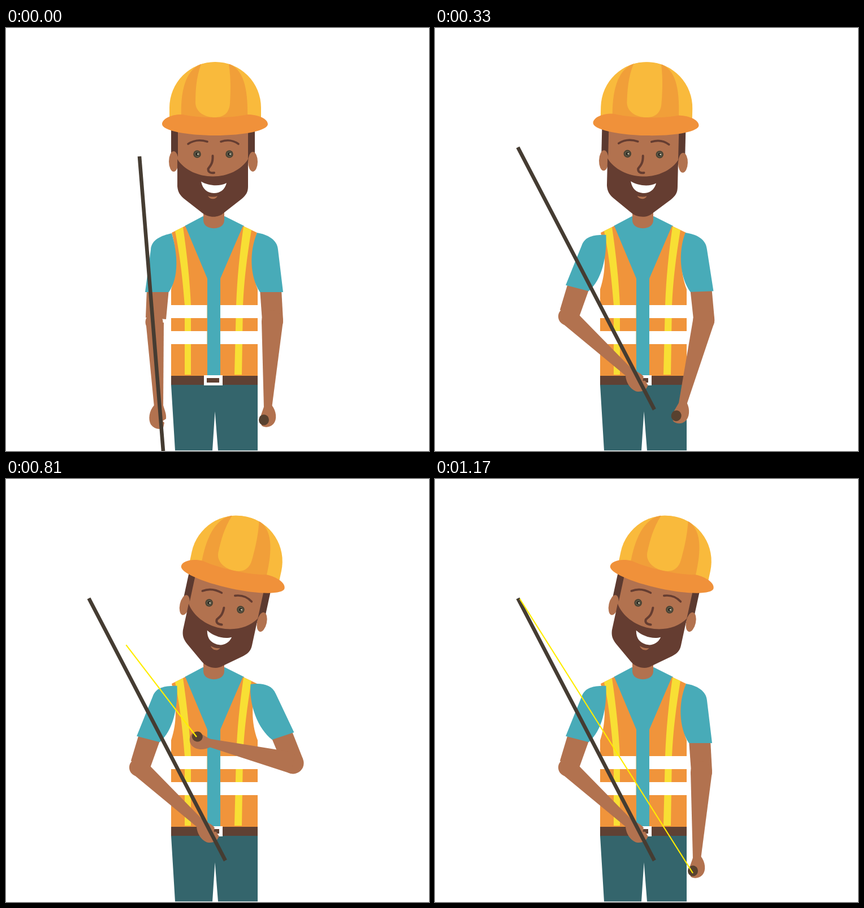
Recreate the animation shown at these times as an HTML page with a canvas. Size 748 px wide and 748 px high, loop 1.77 s.

```html
<!DOCTYPE html>
<html lang="en">
<head>
<meta charset="utf-8">
<title>Worker with rod</title>
<style>
  html, body { margin: 0; width: 100%; height: 100%; overflow: hidden; background: #fff; }
  canvas { display: block; width: 748px; height: 748px; }
</style>
</head>
<body>
<canvas id="stage" width="748" height="748"></canvas>
<script>
const ctx = document.getElementById('stage').getContext('2d');
const LOOP = 1770, STEP = 30, LAST_STEP = 38;

const SKIN = '#b2724f', HAIR = '#653d31', TEAL = '#48abb8', VEST = '#f0943b',
  YELLOW = '#f8df34', BELT = '#5f4133', PANTS = '#34656c', ROD = '#453c32',
  HELMET = '#f9ba3c', HELMET_DARK = '#f19f39', BRIM = '#f0913a', THREAD = '#ffed00';

const clamp = v => Math.min(1, Math.max(0, v));
const ramp = (n, from, to) => clamp((n - from) / (to - from));
const mix = (a, b, u) => a + (b - a) * u;

function fill(color, d) {
  ctx.fillStyle = color;
  ctx.fill(new Path2D(d));
}

function stroke(color, width, d, cap = 'round') {
  ctx.strokeStyle = color;
  ctx.lineWidth = width;
  ctx.lineCap = cap;
  ctx.stroke(new Path2D(d));
}

function oval(color, x, y, rx, ry = rx) {
  ctx.fillStyle = color;
  ctx.beginPath();
  ctx.ellipse(x, y, rx, ry, 0, 0, Math.PI * 2);
  ctx.fill();
}

function rotateAbout([x, y], degrees) {
  ctx.translate(x, y);
  ctx.rotate(degrees * Math.PI / 180);
  ctx.translate(-x, -y);
}

function turned(pivot, degrees, draw) {
  ctx.save();
  rotateAbout(pivot, degrees);
  draw();
  ctx.restore();
}

function drawBody() {
  fill(TEAL, 'M348 333L316 350L354 443V616H381V443L421 350L387 333Z');
  fill(SKIN, 'M349 315H386V340C386 359 349 359 349 340Z');

  fill(VEST, 'M293 362L317 350L356 443V615H292V462C303 430 302 395 293 362Z');
  fill(VEST, 'M444 362L419 350L379 443V615H445V462C433 430 434 395 444 362Z');
  fill(YELLOW, 'M299 359L313 352C320 400 325 445 327 490V613H316V490C312 440 308 405 299 359Z');
  fill(YELLOW, 'M420 351L434 357C426 405 421 445 419 490L417 613H404L407 490C409 440 413 400 420 351Z');
  ctx.fillStyle = '#fff';
  for (const y of [490, 536]) {
    ctx.fillRect(291, y, 64.5, 23);
    ctx.fillRect(379, y, 67, 23);
  }

  fill(PANTS, 'M292 631H445V747H375L369.5 678L365 747H299Z');
  fill(BELT, 'M292 615H445V631H292Z');
  fill('#fff', 'M350 614H383V632H350Z');
  fill(BELT, 'M355 619H377V627H355Z');
}

function drawHead() {
  fill('#5c3a30', 'M292 180H440V222L428 236H303L292 222Z');
  oval(SKIN, 296.5, 236, 8.5, 18);
  oval(SKIN, 436.5, 236.5, 8.5, 17.5);
  fill(SKIN, 'M304 178H428V240C420 275 312 275 304 240Z');
  fill(HAIR, 'M303 232C315 251 340 262.5 366 262.5S416 251 428 232V280C428 290 425 295 417 302'
    + 'L385 327C376 336 358 336 347 327L315 302C307 295 304 290 303 280Z');
  fill('#fff', 'M345 271.5C358 279 377 281 390 274C387 287 377 292.5 367 292C356 291 348 286 345 271.5Z');
  fill(SKIN, 'M357 297C363 299 369 299 374 297C371 304 361 304 357 297Z');
  stroke(HAIR, 4, 'M365.5 226C366 239 362 243 357.5 249C357 255 362 257 368 256');
  stroke(HAIR, 3.6, 'M322 205Q337 195 356 201M380 201Q397 195 411 205');
  for (const x of [338, 395]) {
    oval('#4b4435', x, 223, 6.8);
    oval('#77715c', x, 223, 4.2);
    oval('#2f2c25', x, 223, 3.2);
    oval('#d5d0b4', x + 1.5, 223, 1.4);
  }

  fill(HELMET, 'M289 160V141A81 81 0 0 1 451 141V160Z');
  fill(HELMET_DARK, 'M344 64C316 76 308 115 310 160H427C428 115 423 76 396 64Z');
  fill(HELMET, 'M345 64Q369 57 394 64C398 90 397 115 396 133C395 150 385 158 369 158'
    + 'S336 150 335 133C335 112 336 88 345 64Z');
  fill(BRIM, 'M276 170C276 160 294 152 312 153C345 160 395 160 427 153C445 153 463 160 463 170'
    + 'C463 181 422 190 370 190S276 181 276 170Z');
}

function drawArm({ shoulder, elbow, radius, upper, sleeve, lower }, swing, bend) {
  turned(shoulder, swing, () => {
    fill(SKIN, upper);
    fill(TEAL, sleeve);
    // The forearm turns by an absolute angle around the swung elbow.
    turned(elbow, bend - swing, () => {
      oval(SKIN, ...elbow, radius);
      lower();
    });
  });
}

const rodArm = {
  shoulder: [287, 402], elbow: [262, 520], radius: 15.5, swing: 14.4, bend: -44.8,
  upper: 'M249 462H288L283 515L247 512Z',
  sleeve: 'M293 363C275 367 257 374 256 392L246 467H288C306 441 304 400 293 363Z',
  lower() {
    fill(SKIN, 'M247 517L279 521L278 670H262Z');
    fill(SKIN, 'M262 667C253 677 251 692 256 701C262 709 271 711 278 707L280 698L277 695'
      + 'L283 691C284 682 280 675 278 667Z');
  }
};

const freeArm = {
  shoulder: [441.4, 398], elbow: [471, 518], radius: 19, swing: -18.5, bend: 100.6,
  upper: 'M449 462H487L490 517L453 518Z',
  sleeve: 'M444 362C462 365 480 374 481 392L490 467H449C431 440 430 395 444 362Z',
  lower() {
    fill(SKIN, 'M452 518L490 518L470 672H456Z');
    fill(SKIN, 'M457 667H470C478 677 480 692 473 700C467 707 457 707 452 703L449 690Z');
    oval('#58412f', 456, 693, 9, 9.5);
  }
};

function drawRod(lift) {
  const { shoulder, elbow, swing, bend } = rodArm;
  const tilt = -22.9;
  ctx.save();
  rotateAbout(shoulder, swing * lift);
  rotateAbout(elbow, (bend - swing) * lift);
  // The rod keeps its own tilt while the grip follows the hand.
  rotateAbout([273, 689], (tilt - bend) * lift);
  stroke(ROD, 6.6, 'M236 227L278 748', 'butt');
  ctx.restore();
}

function drawThread(grow, pull) {
  if (!grow) return;
  const curve = (a, b, c) => (1 - pull) ** 2 * a + 2 * pull * (1 - pull) * b + pull ** 2 * c;
  const endX = curve(337, 313, 456), endY = curve(456, 590, 697);
  const tipX = mix(337, 150, grow), tipY = mix(456, 212, grow);
  stroke(THREAD, 2.2, `M${tipX} ${tipY}L${endX} ${endY}`, 'butt');
}

function render(time) {
  const n = Math.min(LAST_STEP, Math.max(0, Math.floor(time / STEP) - 1));
  const lift = ramp(n, 0, 9);
  const tilt = ramp(n, 9, 18);
  const reach = tilt - ramp(n, 30, 35);

  ctx.fillStyle = '#fff';
  ctx.fillRect(0, 0, 748, 748);
  drawBody();
  turned([367.4, 320], 12.2 * tilt, drawHead);
  drawArm(rodArm, rodArm.swing * lift, rodArm.bend * lift);
  drawArm(freeArm, freeArm.swing * reach, freeArm.bend * reach);
  drawRod(lift);
  drawThread(ramp(n, 18, 30), ramp(n, 30, 38));
}

const start = performance.now();
function tick() {
  render((performance.now() - start) % LOOP);
  requestAnimationFrame(tick);
}
tick();
</script>
</body>
</html>
```
